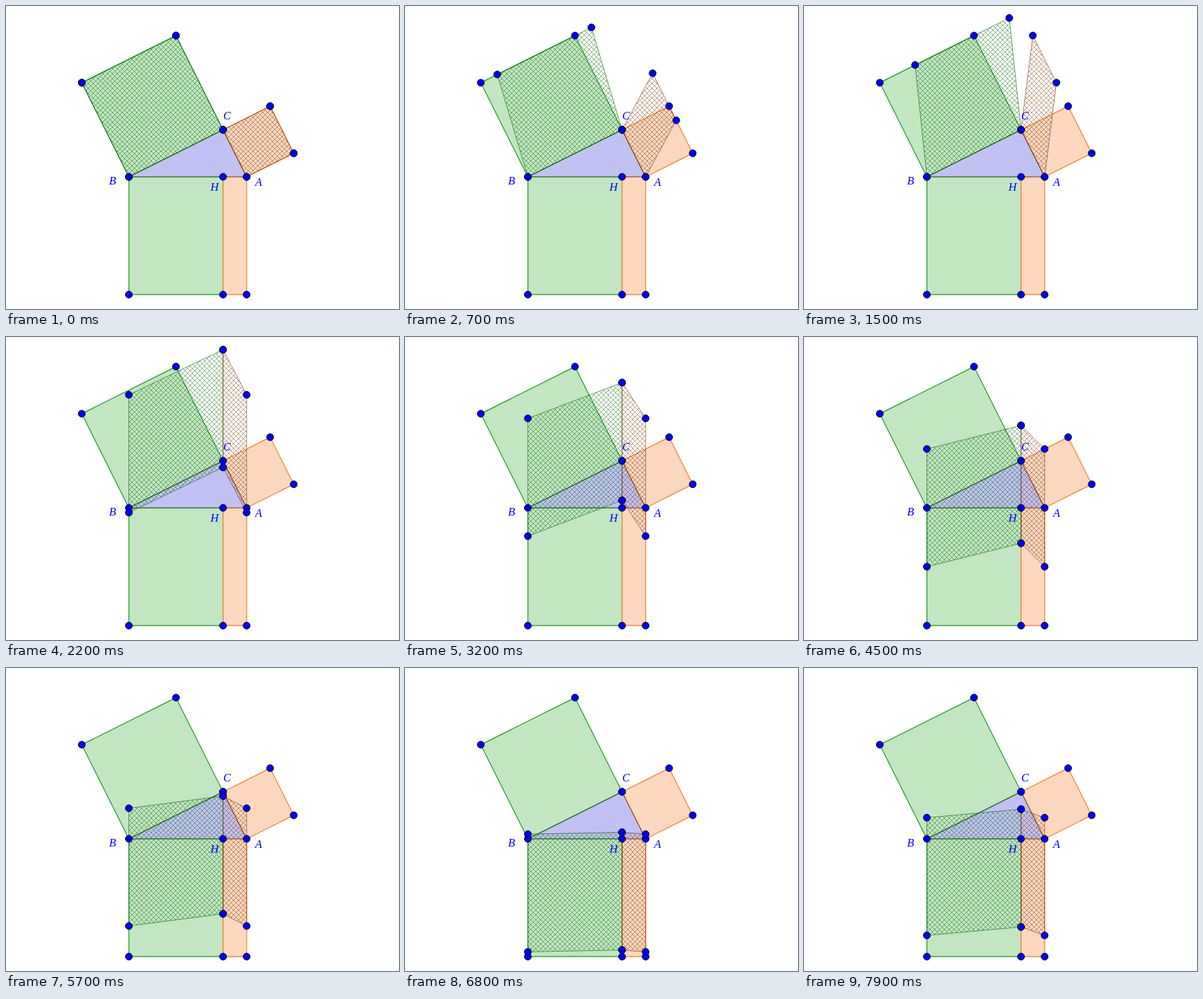
Recreate the animation shown at these times as an HTML page. Size 568 by 438 pixels, loop 8000 ms.

```html
<!DOCTYPE html>
<html lang="en">
<head>
<meta charset="utf-8">
<title>Squares on a right triangle</title>
<style>
  html, body { margin: 0; width: 100%; height: 100%; overflow: hidden; background: #fff; }
  svg { display: block; width: 568px; height: 438px; }
  text { font: italic 16.5px "Liberation Serif", "Noto Serif", serif; fill: #00f; }
  .green { fill: #c1e6c1; stroke: #1a9a1f; }
  .orange { fill: #fdd8bf; stroke: #f97a20; }
  .triangle { fill: #c1c1f3; stroke: none; }
  .edge { fill: none; stroke: #000; stroke-opacity: .45; }
  .greenHatch { fill: url(#greenLines); stroke: #006400; stroke-width: .6; }
  .brownHatch { fill: url(#brownLines); stroke: #7a3000; stroke-width: .6; }
  circle { fill: #00f; stroke: #000; }
  polygon { stroke-width: 1.2; stroke-linejoin: round; }
</style>
</head>
<body>
<svg viewBox="0 0 568 438">
  <defs>
    <pattern id="greenLines" width="7" height="7" patternUnits="userSpaceOnUse">
      <path d="M-1 -1L8 8M-1 8L8 -1" stroke="#006400" stroke-width=".5"/>
    </pattern>
    <pattern id="brownLines" width="7" height="7" patternUnits="userSpaceOnUse">
      <path d="M-1 -1L8 8M-1 8L8 -1" stroke="#7a3000" stroke-width=".5"/>
    </pattern>
  </defs>
  <g id="shapes"></g>
  <g id="dots"></g>
  <text x="149" y="257.5">B</text>
  <text x="360" y="259.5">A</text>
  <text x="314" y="163.5">C</text>
  <text x="295.5" y="266.5">H</text>
</svg>
<script>
const LOOP = 8000, STEP = 100, SHEAR_STEPS = 20, DROP_STEPS = 50;
const SIDE = 170.2, FOOT = 136.1, HEIGHT = 68.05;
const B = [177.6, 247];
const A = [B[0] + SIDE, B[1]];
const H = [B[0] + FOOT, B[1]];
const C = [H[0], B[1] - HEIGHT];

const move = ([x, y], dx, dy) => [x + dx, y + dy];
const below = p => [p[0], B[1] + SIDE];

// Offsets that carry a triangle leg to the far side of its square
const greenOut = [B[1] - C[1], C[0] - B[0]].map(v => -v);
const brownOut = [A[1] - C[1], C[0] - A[0]];

function add(parent, tag, className) {
  const el = document.createElementNS("http://www.w3.org/2000/svg", tag);
  if (className) el.setAttribute("class", className);
  return document.getElementById(parent).appendChild(el);
}
const setPoints = (el, points) => el.setAttribute("points", points.join(" "));
function polygon(className, points = []) {
  const el = add("shapes", "polygon", className);
  setPoints(el, points);
  return el;
}
function setDot(el, [x, y]) {
  el.setAttribute("cx", x);
  el.setAttribute("cy", y);
}
function dot(point) {
  const el = add("dots", "circle");
  el.setAttribute("r", 5);
  setDot(el, point);
  return el;
}

const greenSquare = [B, C, move(C, ...greenOut), move(B, ...greenOut)];
const orangeSquare = [A, C, move(C, ...brownOut), move(A, ...brownOut)];

polygon("triangle", [A, B, C]);
polygon("green", greenSquare);
polygon("orange", orangeSquare);
polygon("green", [B, H, below(H), below(B)]);
polygon("orange", [H, A, below(A), below(H)]);
polygon("edge", [A, B, C]);
const greenHatch = polygon("greenHatch");
const brownHatch = polygon("brownHatch");

[...greenSquare, ...orangeSquare, H, below(B), below(H), below(A)].forEach(dot);
const movingDots = Array.from({ length: 8 }, () => dot(B));

// Shear each square until its sides are vertical, then slide it down
function slide(leg, out, shear, drop) {
  const top = [out[0] * (1 - shear), out[1] + (-SIDE - out[1]) * shear];
  const base = leg.map(p => move(p, 0, (below(p)[1] - p[1]) * drop));
  return [...base, ...[...base].reverse().map(p => move(p, ...top))];
}

function draw(time) {
  const step = Math.floor((time % LOOP) / STEP + 1e-4);
  const shear = Math.min(1, step / SHEAR_STEPS);
  const phase = Math.max(0, step - SHEAR_STEPS) / DROP_STEPS;
  const drop = phase > 1 ? 2 - phase : phase;
  const green = slide([B, C], greenOut, shear, drop);
  const brown = slide([A, C], brownOut, shear, drop);
  setPoints(greenHatch, green);
  setPoints(brownHatch, brown);
  [...green, ...brown].forEach((p, i) => setDot(movingDots[i], p));
}

function tick() {
  draw(performance.now());
  requestAnimationFrame(tick);
}
draw(0);
requestAnimationFrame(tick);
</script>
</body>
</html>
```
